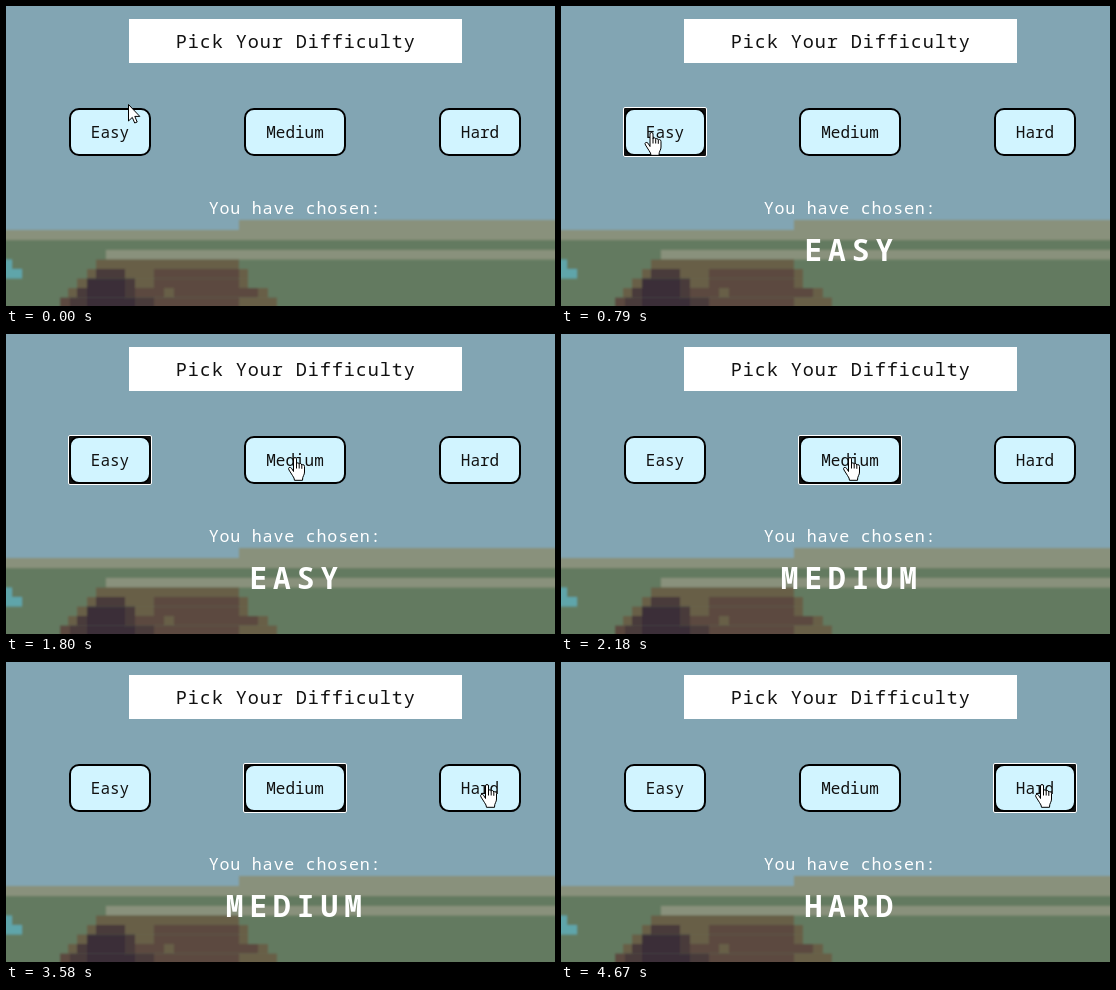
Animation of 549 by 300 pixels, one loop 4.75 s. Source, as an HTML page:

```html
<!DOCTYPE html>
<html lang="en">
<head>
<meta charset="utf-8">
<title>Pick Your Difficulty</title>
<style>
  html, body { margin: 0; width: 100%; height: 100%; overflow: hidden; background: #82a5b3; }
  svg { display: block; width: 549px; height: 300px; }
  text { font-family: "Noto Sans Mono", "DejaVu Sans Mono", monospace; text-anchor: middle; white-space: pre; }
  .title { font-size: 18.5px; letter-spacing: .9px; fill: #111; }
  .label { font-size: 16px; fill: #111; }
  .prompt { font-size: 16.7px; letter-spacing: .78px; fill: #fff; }
  .choice { font-size: 29.5px; font-weight: 900; letter-spacing: 6px; fill: #fff; }
  .cursor { fill: #fff; stroke: #000; stroke-width: 1; stroke-linejoin: round; }
</style>
</head>
<body>
<svg viewBox="0 0 549 300">
  <defs>
    <filter id="soft" x="-5%" y="-5%" width="110%" height="110%"><feGaussianBlur stdDeviation=".9"/></filter>
  </defs>
  <rect width="549" height="300" fill="#82a5b3"/>
  <g id="scene" filter="url(#soft)"></g>
  <rect x="123" y="13" width="333" height="44" fill="#fff"/>
  <text class="title" x="289.7" y="42">Pick Your Difficulty</text>
  <g id="buttons"></g>
  <text class="prompt" x="289" y="208">You have chosen:</text>
  <text class="choice" id="choice" x="290.8" y="255"></text>
  <g class="cursor" id="cursor">
    <path id="arrow" d="M.5 .5V17L4.3 13.4L6.7 19L9.2 18L6.8 12.4H11.8Z"/>
    <g id="hand" transform="translate(-5.5 0)">
      <path d="M5.5 14.5V2Q5.5 .5 7 .5T8.5 2V7Q8.5 5.8 9.8 5.8T11.2 7.3Q11.4 6.5 12.4 6.5T13.8 8.2Q14.1 7.6 15 7.6Q16.5 7.7 16.5 9.5V15Q16.5 17 15.5 18.7Q14.5 20.3 14.5 23.3H6.5Q6.4 21 4.6 18.7L1 13Q0 11.3 1.1 10.6Q2.3 10 3.6 11.3Z"/>
      <path d="M8.5 7V11.5M11.2 7.3V11.5M13.8 8.2V11.8" fill="none"/>
    </g>
  </g>
</svg>
<script>
const LOOP = 4750;
const $ = id => document.getElementById(id);

function add(parent, tag, attrs, text) {
  const el = document.createElementNS("http://www.w3.org/2000/svg", tag);
  for (const key in attrs) el.setAttribute(key, attrs[key]);
  if (text) el.textContent = text;
  parent.append(el);
  return el;
}

const TAN = "#89917b", GREEN = "#637a61", OLIVE = "#685f47";
const BROWN = "#5b4a40", DARK = "#493a3b", SHADE = "#3b2f37", TEAL = "#5ea5aa";

// Each row: top, bottom, first x, then colour and right edge of every run
const ROWS = [
  [224, 234, -9, TAN, 560],
  [214, 225, 233, TAN, 560],
  [234, 310, -9, GREEN, 560],
  [244, 253.5, 100, TAN, 560],
  [253.5, 263, -9, TEAL, 6],
  [263, 272.5, -9, TEAL, 16],
  [253.5, 263, 90, OLIVE, 233],
  [263, 272.5, 81, OLIVE, 90, DARK, 119, OLIVE, 148, BROWN, 233, OLIVE, 242],
  [272.5, 282, 71, OLIVE, 81, SHADE, 119, DARK, 129, OLIVE, 148, BROWN, 233, OLIVE, 242],
  [282, 291.5, 62, OLIVE, 71, DARK, 81, SHADE, 119, DARK, 129, BROWN, 158, OLIVE, 168, BROWN, 252, OLIVE, 262],
  [291.5, 310, 54, BROWN, 64, DARK, 81, SHADE, 129, DARK, 148, BROWN, 233, OLIVE, 271]
];
for (const [top, bottom, start, ...runs] of ROWS) {
  let x = start;
  for (let i = 0; i < runs.length; i += 2) {
    add($("scene"), "rect", { x, y: top, width: runs[i + 1] - x, height: bottom - top, fill: runs[i] });
    x = runs[i + 1];
  }
}

const BUTTONS = [["Easy", 63, 82], ["Medium", 238, 102], ["Hard", 433, 82]];
const rings = BUTTONS.map(([name, x, w]) => {
  const g = $("buttons");
  const ring = add(g, "rect", {
    x: x - .5, y: 101.5, width: w + 1, height: 49, rx: 1.5, fill: "#101010", stroke: "#fff"
  });
  add(g, "rect", { x: x + 1, y: 103, width: w - 2, height: 46, rx: 9, fill: "#d1f4ff", stroke: "#000", "stroke-width": 2 });
  add(g, "text", { class: "label", x: x + w / 2, y: 132 }, name);
  return ring;
});

// Pointer: time, x, y
const PATH = [
  [0, 122, 98], [90, 113, 107], [170, 100, 118], [240, 92, 124], [320, 89, 126],
  [1410, 96.5, 121], [1490, 125, 115], [1560, 180, 113], [1640, 242, 115], [1720, 277, 120], [1800, 287.5, 123],
  [3110, 289.5, 120], [3190, 308, 111], [3270, 350, 101], [3340, 400, 98], [3420, 446, 108], [3500, 472, 119], [3580, 479.5, 122]
];
// Focus follows the press, the answer follows the release
const FOCUS = [[0, -1], [710, 0], [2110, 1], [3810, 2]];
const CHOICE = [[0, ""], [790, "EASY"], [2180, "MEDIUM"], [3970, "HARD"]];

const at = (steps, t) => steps.findLast(step => step[0] <= t);
const overButton = (x, y) => y >= 102 && y < 150 && BUTTONS.some(([, left, w]) => x >= left && x < left + w);

function draw(t) {
  const [, x, y] = at(PATH, t);
  const focus = at(FOCUS, t)[1];
  const over = overButton(x, y);
  $("cursor").setAttribute("transform", `translate(${x} ${y})`);
  $("hand").style.display = over ? "" : "none";
  $("arrow").style.display = over ? "none" : "";
  rings.forEach((ring, i) => ring.style.display = i === focus ? "" : "none");
  $("choice").textContent = at(CHOICE, t)[1];
}

const start = performance.now();
function tick() {
  draw((performance.now() - start) % LOOP);
  requestAnimationFrame(tick);
}
tick();
</script>
</body>
</html>
```
